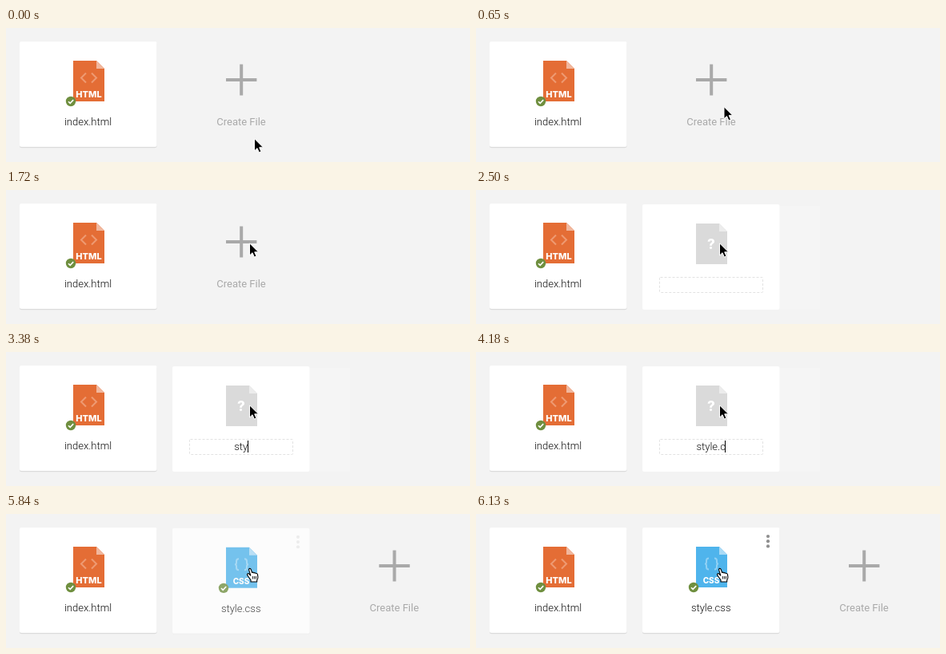
An HTML page that plays this animation: 580 by 168 pixels, repeating every 8000 ms.

```html
<!DOCTYPE html>
<html lang="en">
<head>
<meta charset="utf-8">
<title>Create a file</title>
<style>
  html, body { margin: 0; width: 100%; height: 100%; overflow: hidden; background: #f3f3f3; }
  svg { display: block; width: 580px; height: 168px; }
  text { font: 300 13px Roboto, sans-serif; text-anchor: middle; fill: #111; }
  .badge { font: 800 11px Inter, sans-serif; fill: #fff; }
  .create text { font-weight: 400; fill: #a9a9a9; }
  .line { fill: none; stroke-width: 2; }
</style>
</head>
<body>
<svg id="stage" viewBox="0 0 580 168"></svg>
<script>
const LOOP = 8000;
const NAME = 'style.css';
const TYPE_START = 2980, TYPE_GAP = 200;

const doc = (fill, fold, inner) => `
  <path d="M84 41h29l10 10v41h-39z" fill="${fill}"/>
  <path d="M113 41l10 10h-10z" fill="${fold}"/>${inner}`;

const shadow = '<rect x="17" y="18" width="171.5" height="132.3" rx="2" fill="#dcdcdc"/>';
const sheet = '<rect x="17" y="17" width="171.5" height="132" rx="2" fill="#fff"/>';

const check = `
  <circle cx="81" cy="92" r="6.2" fill="#6f8f3f"/>
  <path class="line" d="M78 92.2l2.2 2.2 4-4.3" stroke="#fff" style="stroke-width:1.6"/>`;

const sync = `
  <circle cx="81" cy="92" r="6.2" fill="#5388c8"/>
  <g id="spin">
    <path class="line" d="M77.7 91.3a3.4 3.4 0 0 1 5.8-1.7M84.3 92.7a3.4 3.4 0 0 1-5.8 1.7"
      stroke="#fff" style="stroke-width:1.3"/>
    <path d="M85 88v3.2h-3.2zM77 96v-3.2h3.2z" fill="#fff"/>
  </g>`;

const htmlIcon = doc('#e46d35', '#f1b79d', `
  <path class="line" d="M100 56.5l-6 6 6 6M107 56.5l6 6-6 6" stroke="#ee9a72"/>
  <text class="badge" x="103.5" y="87">HTML</text>`);

const cssIcon = doc('#4fb4ec', '#a9daf6', `
  <path class="line" d="M100 55.5q-3 0-3 3v2q0 2-2 2q2 0 2 2v2q0 3 3 3
    M107 55.5q3 0 3 3v2q0 2 2 2q-2 0-2 2v2q0 3-3 3" stroke="#8fd0f4"/>
  <text class="badge" x="103" y="87" style="font-size:10px">CSS</text>`);

const blankIcon = doc('#dadada', '#ececec',
  '<text class="badge" x="103" y="73" style="font-size:17px">?</text>');

document.getElementById('stage').innerHTML = `
  <rect width="580" height="168" fill="#f3f3f3"/>
  ${shadow}${sheet}${htmlIcon}${check}
  <text x="102.5" y="122">index.html</text>

  <g id="create" class="create">
    <path d="M275 65h38.4M294.2 45.5v39" stroke="#a9a9a9" stroke-width="4"/>
    <text x="294" y="122">Create File</text>
  </g>

  <g id="edit">
    <rect x="380" y="20" width="50" height="130" fill="#f5f5f5"/>
    <g transform="translate(191 1)">
      ${sheet}${blankIcon}
      <rect x="38.5" y="108.5" width="129" height="19" rx="1" fill="none" stroke="#e2e2e2" stroke-dasharray="3 2"/>
      <text id="typed" x="102.7" y="122"></text>
    </g>
    <rect id="caret" y="111" width="1" height="15" fill="#000"/>
  </g>

  <g id="file">
    <g id="lift">${shadow}</g>
    ${sheet}${cssIcon}
    <g id="busy">${sync}</g>
    <g id="done">${check}</g>
    <text x="102.7" y="122">${NAME}</text>
    <g id="menu" fill="#8f8f8f">
      <circle cx="174" cy="28" r="2.1"/><circle cx="174" cy="34.2" r="2.1"/><circle cx="174" cy="40.4" r="2.1"/>
    </g>
  </g>

  <g id="press">
    <circle cx="306.5" cy="66.5" r="10" fill="#000"/>
    <circle cx="306.5" cy="66.5" r="9" fill="#fff"/>
  </g>
  <path id="arrow" d="M.5.8v15.2l3.5-3.3 2.4 5.4 2.6-1.1-2.3-5.2h4.8z" fill="#000" stroke="#fff"/>
  <g id="hand" fill="#fff" stroke="#000" stroke-width="1.1" stroke-linejoin="round">
    <path d="M306 85v-2.2l-3.6-5.1q-1.6-2.2-.2-2.9 1.2-.6 2.8 1.5l.8.8-2-6.4q-.6-1.9.7-2.3 1.3-.3 1.9 1.5l1.2 3.6
      q1.6-1 2.4.5 1.5-.9 2.3.6 1.7-.6 2.2 1.3l.4 3.2q.1 2-1.2 3.8v2.1z"/>
    <path d="M308.3 78v3.5M310.4 78v3.5M312.4 78v3.5" stroke-width=".9"/>
  </g>`;

const $ = Object.fromEntries([...document.querySelectorAll('[id]')].map(el => [el.id, el]));
const show = (el, on) => el.setAttribute('visibility', on ? 'inherit' : 'hidden');
const move = (el, x, y) => el.setAttribute('transform', `translate(${x} ${y})`);

// Progress 0..1 in n equal jumps, the first at `from`, the last at `to`.
function steps(t, from, to, n) {
  const k = Math.floor((t - from) / (to - from) * (n - 1) + 1e-6) + 1;
  return Math.max(0, Math.min(n, k)) / n;
}

function render(t) {
  const editing = t >= 2500 && t < 4980;
  const created = t >= 4980;
  const ready = t >= 5840;

  const p = steps(t, 300, 1000, 13);
  const eased = p * p * (3 - 2 * p);
  move($.arrow, 310 - 6 * p ** 4, 138 - 72 * eased);
  show($.arrow, !ready);
  show($.hand, ready);
  show($.press, t >= 1600 && t < 1720);

  show($.edit, editing);
  const count = Math.max(0, Math.min(NAME.length, Math.floor((t - TYPE_START) / TYPE_GAP) + 1));
  const value = NAME.slice(0, count);
  if ($.typed.textContent !== value) $.typed.textContent = value;
  show($.caret, editing && count > 0 && t < 4780);
  if (count) $.caret.setAttribute('x', Math.floor(293.7 + $.typed.getComputedTextLength() / 2));

  const settle = steps(t, 5840, 6130, 6);
  show($.file, created);
  move($.file, 191, 1 - settle);
  $.file.setAttribute('opacity', 0.72 + 0.28 * settle);
  $.lift.setAttribute('opacity', settle);
  $.menu.setAttribute('opacity', settle);
  show($.busy, created && !ready);
  show($.done, ready);
  $.spin.setAttribute('transform', `rotate(${steps(t, 4980, 5780, 15) * 300} 81 92)`);

  show($.create, !editing);
  move($.create, created ? 191.4 - 0.4 * settle : 0, 0);
}

const start = performance.now();
function tick() {
  render((performance.now() - start) % LOOP);
  requestAnimationFrame(tick);
}
tick();
</script>
</body>
</html>
```
